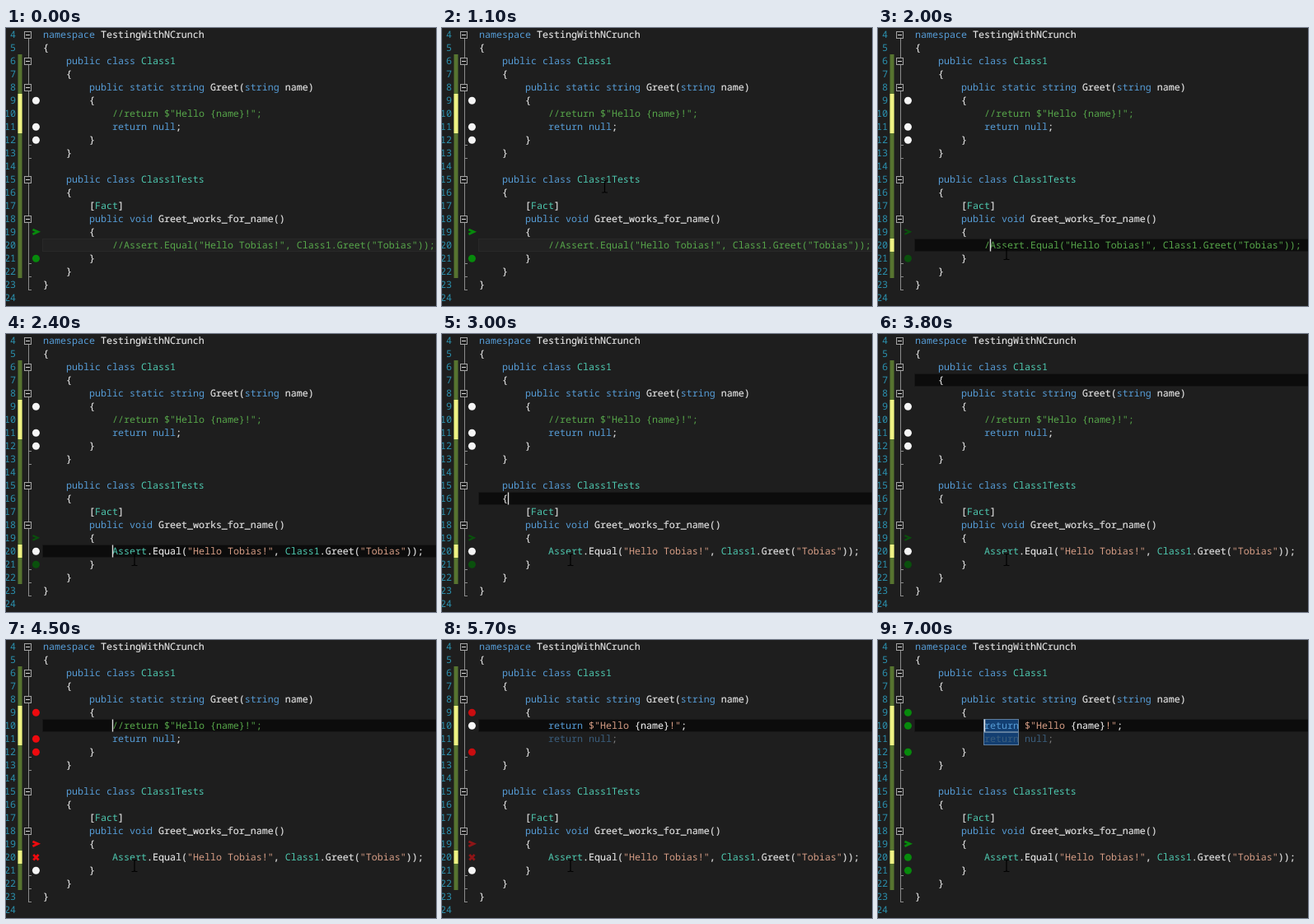
An HTML page for the animation above (7100 ms loop, 522x338 px).

```html
<!DOCTYPE html>
<html lang="en">
<head>
<meta charset="utf-8">
<title>Live test feedback</title>
<style>
html, body { margin: 0; width: 100%; height: 100%; overflow: hidden; background: #1e1e1e; }
svg { display: block; width: 522px; height: 338px; }
text {
  font: 11.667px "Noto Sans Mono", "DejaVu Sans Mono", monospace;
  white-space: pre; text-rendering: geometricPrecision;
}
.p { fill: #e4e4e4 } .k { fill: #569cd6 } .t { fill: #4ec9b0 }
.s { fill: #d69d85 } .c { fill: #57a64a } .n { fill: #2b91af }
.d { fill: #3a5d7c } .e { fill: #808080 }
.p { stroke: #e4e4e4; stroke-width: 0.15 }
</style>
</head>
<body>
<svg id="stage" viewBox="0 0 522 338"></svg>
<script>
const LOOP = 7100, STEP = 100, BLINK = 450;
const LEFT = 45, CHAR = 7, ROW = 16;
const stage = document.getElementById('stage');
const rowY = line => (line - 4) * ROW;
const colX = col => LEFT + col * CHAR;

function add(tag, attrs, parent = stage) {
  const el = document.createElementNS('http://www.w3.org/2000/svg', tag);
  for (const k in attrs) el.setAttribute(k, attrs[k]);
  return parent.appendChild(el);
}
const rect = (x, y, width, height, fill, more) => add('rect', { x, y, width, height, fill, ...more });
const show = (el, on) => el.setAttribute('visibility', on ? 'visible' : 'hidden');

// Markup: "~" starts a run, the next letter is its colour class.
function setCode(el, markup) {
  if (el.markup === markup) return;
  el.markup = markup;
  el.textContent = '';
  for (const run of markup.split('~').slice(1))
    add('tspan', { class: run[0] }, el).textContent = run.slice(1);
}

const ASSERT = 'Assert.Equal("Hello Tobias!", Class1.Greet("Tobias"));';
const ASSERT_LIVE = '~tAssert~p.Equal(~s"Hello Tobias!"~p, ~tClass1~p.Greet(~s"Tobias"~p));';
const RETURN = 'return $"Hello {name}!";';
const RETURN_LIVE = '~kreturn ~s$"Hello ~p{name}~s!"~p;';

const code = {
  4: [0, '~knamespace ~pTestingWithNCrunch'],
  5: [0, '~p{'],
  6: [4, '~kpublic class ~tClass1'],
  7: [4, '~p{'],
  8: [8, '~kpublic static string ~pGreet(~kstring ~pname)'],
  9: [8, '~p{'],
  10: [12, '~c//' + RETURN],
  11: [12, '~kreturn null~p;'],
  12: [8, '~p}'],
  13: [4, '~p}'],
  15: [4, '~kpublic class ~tClass1Tests'],
  16: [4, '~p{'],
  17: [8, '~p[~tFact~p]'],
  18: [8, '~kpublic void ~pGreet_works_for_name()'],
  19: [8, '~p{'],
  20: [12, '~c//' + ASSERT],
  21: [8, '~p}'],
  22: [4, '~p}'],
  23: [0, '~p}']
};

// Each table holds [start ms, value]; the last one reached applies.
const edits = {
  10: [[0, '~c//' + RETURN], [5000, '~c/' + RETURN], [5200, RETURN_LIVE]],
  11: [[0, '~kreturn null~p;'], [5400, '~dreturn null~e;']],
  20: [[0, '~c//' + ASSERT], [1900, '~c/' + ASSERT], [2100, ASSERT_LIVE]]
};
const caretSteps = [
  [0, [20, 14]], [1400, [20, 14]], [1900, [20, 13]], [2100, [20, 12]],
  [2500, [19, 9]], [2900, [18, 12]], [3000, [16, 5]], [3100, [12, 9]], [3200, [7, 5]],
  [4000, [8, 12]], [4100, [9, 9]], [4200, [10, 12]], [5000, [10, 12]], [5200, [10, 12]]
];
// Marks: line, shape (o dot, v chevron, x cross), colour.
const markSteps = [
  [0, '9ow 11ow 12ow 19vg 21og'],
  [1900, '9ow 11ow 12ow 19vG 21oG'],
  [2300, '9ow 11ow 12ow 19vG 20ow 21oG'],
  [4000, '9or 11or 12or 19vr 20xr 21ow'],
  [5400, '9oR 10ow 12oR 19vD 20xD 21ow'],
  [6300, '9og 10og 12og 19vg 20og 21og']
];
const markColor = { w: '#f5f5f5', g: '#078a0c', G: '#0a500d', r: '#ee0a0e', R: '#c90d10', D: '#8f1517' };
const mousePath = [[300, 330, -10], [900, 250, 122], [1300, 145, 264], [1500, 156, 274.5]];

const at = (steps, t) => steps.filter(s => s[0] <= t).pop();

// Gutter
rect(14.5, rowY(6), 5, 17 * ROW, '#577430');
rect(14.5, rowY(9), 5, 3 * ROW, '#eff284');
const editedBar = rect(14.5, rowY(20), 5, ROW, '#eff284');
const ticks = [12, 13, 21, 22, 23].map(line => `M27 ${rowY(line) + 14.5}H31`).join('');
add('path', { d: 'M27.5 12V319' + ticks, fill: 'none', stroke: '#8c8c8c' });
for (const line of [4, 6, 8, 15, 18]) {
  const y = rowY(line) + 4.5;
  rect(22.5, y, 8, 8, '#1e1e1e', { stroke: '#a5a5a5' });
  add('path', { d: `M24 ${y + 4}h5`, stroke: '#dcdcdc' });
}
for (let line = 4; line <= 24; line++)
  add('text', { x: 12, y: rowY(line) + 12, class: 'n', 'text-anchor': 'end' }).textContent = line;

// Editor layers, back to front
const current = rect(LEFT - 0.5, 0, 480, ROW - 1);
const hits = [10, 11].map(line =>
  rect(colX(12) - 0.5, rowY(line) + 0.5, 6 * CHAR, ROW - 1, '#133f72', { stroke: '#5f7e9e' }));
const rows = {};
for (const line in code) {
  const [col, markup] = code[line];
  rows[line] = add('text', { x: colX(col), y: rowY(line) + 12 });
  setCode(rows[line], markup);
}
const caret = rect(0, 0, 1.4, ROW - 1, '#dcdcdc');
const marks = add('g', {});
const mouse = add('path', { d: 'M-3.5-7H-1L0-6L1-7H3.5M0-6V6M-3.5 7H-1L0 6L1 7H3.5', fill: 'none', stroke: '#000', 'stroke-width': 1.2 });

function drawMarks(spec) {
  if (marks.spec === spec) return;
  marks.spec = spec;
  marks.textContent = '';
  for (const item of spec.split(' ')) {
    const [, line, shape, key] = item.match(/(\d+)(.)(.)/);
    const color = markColor[key], x = 36.4, y = rowY(line) + 8.3;
    if (shape === 'o') add('circle', { cx: x, cy: y, r: 4.5, fill: color }, marks);
    else add('path', {
      d: shape === 'v' ? `M${x - 4} ${y - 3.4}L${x + 2.3} ${y - 0.5}L${x - 4} ${y + 2.4}`
        : `M${x - 3.2} ${y - 3.2}l6.4 6.4m0 -6.4l-6.4 6.4`,
      fill: 'none', stroke: color, 'stroke-width': key === 'G' ? 2.2 : 2.8
    }, marks);
  }
}

function moveMouse(t) {
  show(mouse, t >= mousePath[0][0]);
  const i = mousePath.findIndex(p => p[0] > t);
  let [, x, y] = mousePath[mousePath.length - 1];
  if (i > 0) {
    const [t0, x0, y0] = mousePath[i - 1], [t1, x1, y1] = mousePath[i];
    const f = (t - t0) / (t1 - t0);
    x = x0 + (x1 - x0) * f;
    y = y0 + (y1 - y0) * f;
  }
  mouse.setAttribute('transform', `translate(${x} ${y})`);
}

function render(t) {
  for (const line in edits) setCode(rows[line], at(edits[line], t)[1]);
  const [since, [line, col]] = at(caretSteps, t);
  const focused = t >= 1400;
  current.setAttribute('y', rowY(line) + 0.5);
  current.setAttribute('fill', focused ? '#0c0c0c' : '#222');
  current.setAttribute('stroke', focused ? '#171717' : '#282828');
  caret.setAttribute('x', colX(col) - 0.2);
  caret.setAttribute('y', rowY(line) + 0.5);
  show(caret, focused && Math.floor((t - since) / BLINK) % 2 === 0);
  show(editedBar, t >= 1900);
  for (const hit of hits) show(hit, t >= 5900);
  drawMarks(at(markSteps, t)[1]);
  moveMouse(t);
}

const start = performance.now();
function tick() {
  const t = (performance.now() - start) % LOOP;
  render(Math.floor(t / STEP) * STEP);
  requestAnimationFrame(tick);
}
tick();
</script>
</body>
</html>
```
